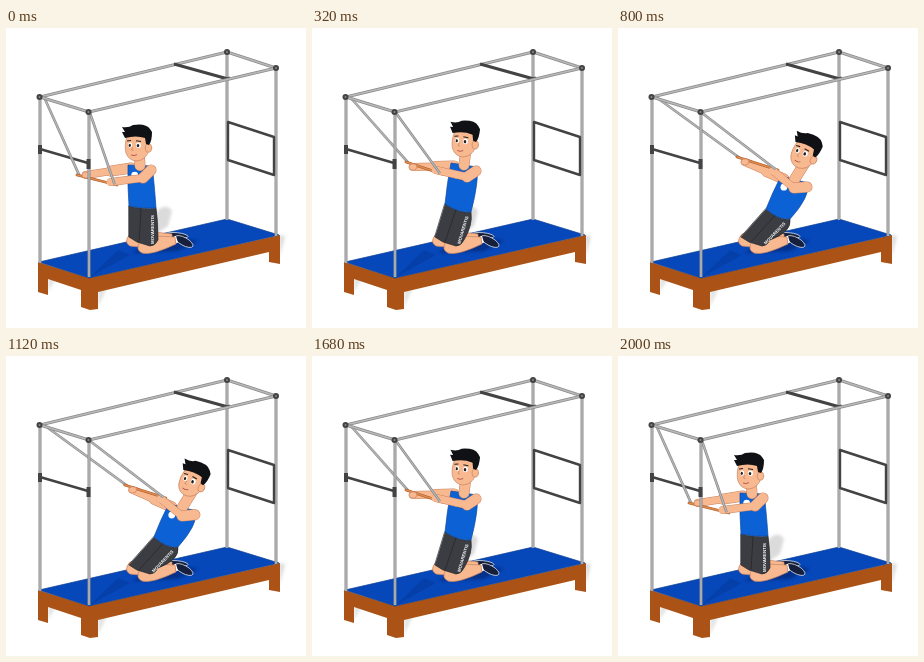
Recreate the animation shown at these times as an HTML page with a canvas. Size 300 px wide and 300 px high, loop 2.44 s.

```html
<!DOCTYPE html>
<html lang="en">
<head>
<meta charset="utf-8">
<title>Kneeling lean on a trapeze table</title>
<style>
html, body { margin: 0; height: 100%; overflow: hidden; background: #fff; }
canvas { display: block; width: 100vw; height: 100vh; }
</style>
</head>
<body>
<canvas id="stage"></canvas>
<script>
const canvas = document.getElementById('stage');
const c = canvas.getContext('2d');
const scale = Math.max(1, devicePixelRatio);
canvas.width = canvas.height = 300 * scale;

const LOOP = 2440, STEP = 40;
const SKIN = '#f8b890', EDGE = '#c98560', DARK = '#434345', WOOD = '#ab5316';

// Each pose: head x, y, tilt, then points: shoulders, hips,
// far hand, near elbow, near hand, both ends of the wooden bar.
const poses = [
  [131, 117, 0, 122, 137, 146, 138, 123, 178, 150, 180, 80, 147, 137, 150, 105, 154, 71, 147, 111, 157],
  [152, 113, .08, 139, 135, 165, 139, 133, 176, 159, 184, 101, 139, 155, 149, 124, 142, 94, 134, 130, 146],
  [170, 116, .22, 149, 138, 179, 144, 140, 178, 166, 188, 109, 132, 170, 155, 142, 140, 103, 129, 146, 142],
  [186, 125, .38, 163, 148, 190, 155, 148, 181, 172, 191, 127, 134, 176, 160, 155, 143, 119, 129, 160, 142]
];
const nodes = [0, .345, .655, 1];

const ease = t => (1 - Math.cos(Math.PI * Math.min(1, t / 800))) / 2;

function lean(t) {
  if (t < 1000) return ease(t);
  if (t < 1400) return 1 - .146 * ((t - 1000) / 400) ** 3;
  return ease(Math.max(0, 2000 - t));
}

// Smooth curve through all four poses
function poseAt(u) {
  const w = nodes.map((a, i) => nodes.reduce((p, b, j) => i === j ? p : p * (u - b) / (a - b), 1));
  return poses[0].map((_, k) => w.reduce((sum, v, i) => sum + v * poses[i][k], 0));
}

const mix = (a, b, k) => [a[0] + (b[0] - a[0]) * k, a[1] + (b[1] - a[1]) * k];
const move = (p, x, y) => [p[0] + x, p[1] + y];

function line(pts, color, width, cap = 'butt') {
  c.beginPath();
  pts.forEach(p => c.lineTo(...p));
  c.strokeStyle = color;
  c.lineWidth = width;
  c.lineCap = cap;
  c.lineJoin = 'round';
  c.stroke();
}

function shape(d, fill, edge, width = .7) {
  const p = new Path2D(d);
  c.fillStyle = fill;
  c.fill(p);
  if (edge) {
    c.strokeStyle = edge;
    c.lineWidth = width;
    c.stroke(p);
  }
}

function oval(x, y, rx, ry, fill, edge, turn = 0) {
  c.beginPath();
  c.ellipse(x, y, rx, ry, turn, 0, 7);
  c.fillStyle = fill;
  c.fill();
  if (edge) {
    c.strokeStyle = edge;
    c.lineWidth = .7;
    c.stroke();
  }
}

function tube(a, b, width = 3) {
  line([a, b], '#8b8b8b', width);
  line([a, b], '#b9b9b9', width * .45);
}

function shadows() {
  c.save();
  c.filter = 'blur(1.5px)';
  shape('M42 248L50 251L42 264Z', '#e4e4e4');
  shape('M92 262L101 260L92 279Z', '#e4e4e4');
  shape('M273 207L279 208L274 229Z', '#ddd');
  c.restore();
}

function table() {
  shape('M32 234L83 250L274 207V236L263 234V224L92 264V281L84 282L75 279V262L42 251V267L32 264Z', WOOD);
  shape('M33 234L221 191L273 207L83 250Z', '#0647b9', '#0b3d92');
  shape('M84 249L112 222L124 227Z', 'rgba(0,20,80,.15)');
}

function backFrame() {
  tube([34, 69], [34, 235]);
  tube([221, 24], [221, 192]);
  tube([34, 69], [221, 24]);
  tube([221, 24], [270, 40]);
  line([[168, 36], [222, 51]], DARK, 3);
  line([[219, 51.5], [224, 50]], DARK, 3);
  line([[34, 121], [82, 135]], DARK, 2.6);
  line([[34, 117], [34, 126]], DARK, 4);
}

function frontFrame() {
  tube([270, 40], [270, 208]);
  tube([83, 85], [83, 249]);
  tube([34, 69], [83, 84]);
  tube([83, 84], [270, 40]);
  line([[222, 94], [268, 109], [268, 147], [222, 132], [222, 94], [268, 109]], DARK, 2.4);
  line([[82.5, 131], [82.5, 141]], DARK, 4);
  for (const [x, y] of [[33.5, 69], [82.5, 84], [221, 24], [270, 40]]) {
    oval(x, y, 3, 3, DARK);
    oval(x, y, 1, 1, '#888');
  }
}

function arm(shoulder, elbow, hand) {
  for (const [color, grow] of [[EDGE, 1], [SKIN, 0]]) {
    line([shoulder, elbow], color, 10 + grow, 'round');
    line([elbow, hand], color, 7 + grow, 'round');
  }
  oval(...hand, 4.4, 3.6, SKIN);
}

function legs() {
  c.save();
  c.filter = 'blur(1.5px)';
  shape('M150 184Q160 174 166 183L162 198L150 206Z', 'rgba(90,90,90,.22)');
  shape('M126 225L172 223L192 213L160 206Z', 'rgba(0,15,70,.4)');
  c.restore();
  oval(171, 207.5, 11, 2.8, '#16203c', '#fff', .1);
  shape('M124 206Q117 214 124 218Q136 221 166 213L166 206L140 203Z', SKIN, EDGE);
  oval(178, 213.5, 10, 4, '#16203c', '#fff', .5);
  line([[169, 208], [171, 215]], '#fff', 2);
  shape('M134 213Q129 222 136 225Q145 228 170 216L169 209L150 208Z', SKIN, EDGE);
}

function head(x, y, tilt) {
  c.save();
  c.translate(x, y);
  c.rotate(tilt);
  shape('M-10 -9Q-13 1 -11 8Q-8 16 0 16Q9 15 12 5L11 -10Z', SKIN, EDGE);
  oval(11.5, 3, 3.2, 4.2, SKIN, EDGE);
  shape('M-12 -7L-15 -13L-12 -13L-15 -18Q-8 -17 -4 -20Q9 -22 13 -16L15 -13Q15 -4 12 0L9 -1L8 -7Q-1 -10 -12 -7Z', '#101114');
  oval(-6.8, 0, 2, 2.7, '#fff');
  oval(1.5, .3, 2.5, 2.8, '#fff');
  oval(-7.2, .3, 1.1, 1.6, '#222');
  oval(1, .6, 1.3, 1.7, '#222');
  line([[-10, -4], [-6, -4.5]], '#222', 1.1);
  line([[-1, -4.2], [4, -3.5]], '#222', 1.1);
  line([[-4.5, 2], [-5.5, 5], [-3.5, 5.5]], EDGE, .8);
  line([[-6, 10], [-3, 10.6], [0, 9.6]], '#a9584a', .9);
  c.restore();
}

function shorts(hipL, hipR) {
  shape(`M${hipL}Q${move(hipR, -10, 2)} ${hipR}Q${move(hipR, 2, 13)} 152 212Q149 218 144 218L131 214L123 209Z`, '#3b3d42', '#26272b');
  line([mix(hipL, hipR, .45), [133, 214]], '#26272b', .8);
  const from = [147, 216], to = move(hipR, -3, 2);
  c.save();
  c.translate(...from);
  c.rotate(Math.atan2(to[1] - from[1], to[0] - from[0]));
  c.font = 'bold 4.4px Arial, "Liberation Sans", sans-serif';
  c.textBaseline = 'middle';
  c.fillStyle = '#fff';
  c.fillText('MOVARENTIS', 0, 0);
  c.restore();
}

function draw(t) {
  const p = poseAt(lean(t));
  const [shL, shR, hipL, hipR, farHand, elbow, hand, barA, barB] =
    Array.from({ length: 9 }, (_, i) => [p[3 + 2 * i], p[4 + 2 * i]]);
  const chest = mix(shL, shR, .5);
  const neck = [chest, [p[0] + 2, p[1] + 8]];

  c.setTransform(scale, 0, 0, scale, 0, 0);
  c.fillStyle = '#fff';
  c.fillRect(0, 0, 300, 300);
  shadows();
  table();
  backFrame();
  legs();

  const far = move(shL, 3, 3);
  arm(far, mix(far, farHand, .45), farHand);
  shorts(hipL, hipR);
  shape(`M${shL}L${shR}Q${move(shR, 2, 14)} ${hipR}Q${move(hipR, -12, 1)} ${hipL}Q${move(mix(shL, hipL, .5), -1, 0)} ${shL}Z`, '#0c62d4', '#0d489f');
  line(neck, EDGE, 11, 'round');
  line(neck, SKIN, 10, 'round');
  oval(...move(mix(chest, mix(hipL, hipR, .5), .28), -6, -2), 3.4, 3.4, '#fff');
  head(p[0], p[1], p[2]);

  tube([38, 69], mix(barA, barB, .06), 2.6);
  line([barA, barB], '#a85a2c', 2.8, 'round');
  line([barA, barB], '#e08a4c', 1.6, 'round');
  arm(move(shR, -1, 4), elbow, hand);
  oval(...farHand, 4, 3.2, SKIN, EDGE);
  tube([84, 85], mix(barA, barB, .94), 2.6);
  frontFrame();
}

function tick(now) {
  draw(Math.floor(now % LOOP / STEP) * STEP);
  requestAnimationFrame(tick);
}
requestAnimationFrame(tick);
</script>
</body>
</html>
```
